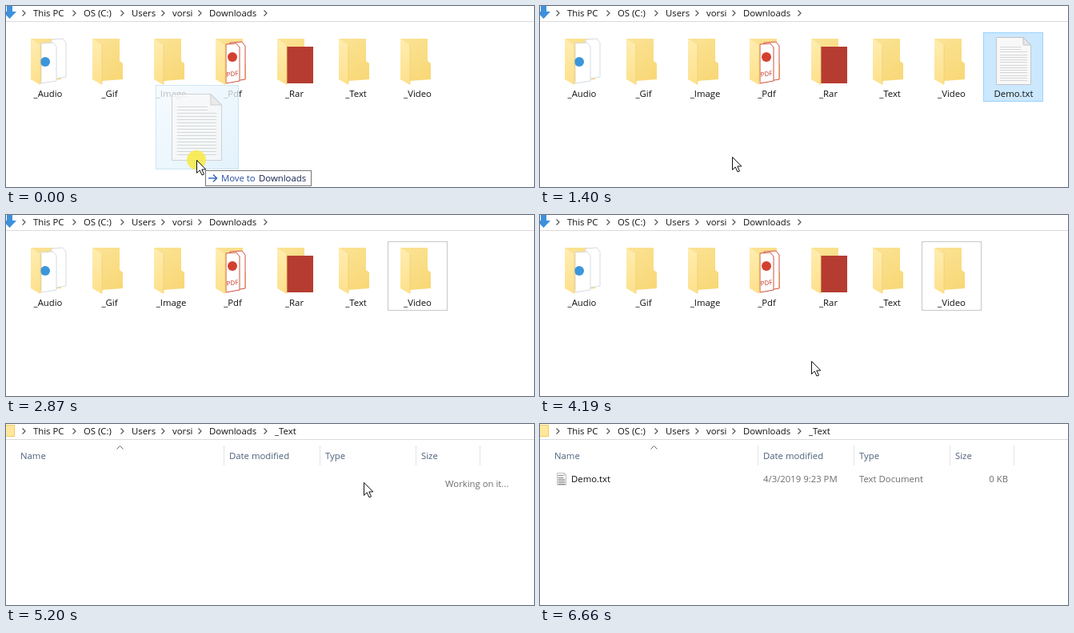
An HTML page with a canvas that plays this animation: 660 by 227 pixels, repeating every 6.97 s.

```html
<!DOCTYPE html>
<html lang="en">
<head>
<meta charset="utf-8">
<title>Sorting a download</title>
<style>
html, body { margin: 0; width: 660px; height: 227px; overflow: hidden; background: #fff; }
canvas { display: block; }
</style>
</head>
<body>
<canvas id="stage" width="660" height="227"></canvas>
<script>
const ctx = document.getElementById('stage').getContext('2d');
const LOOP = 6970, STEP = 77;
const FOLDERS = ['_Audio', '_Gif', '_Image', '_Pdf', '_Rar', '_Text', '_Video'];
const CRUMBS = [['This PC', 34], ['OS (C:)', 97], ['Users', 157], ['vorsi', 208], ['Downloads', 254]];
const APPROACH = [[339, 183], [347, 173], [360, 153], [383, 119], [411, 109], [430, 94], [442, 80], [447, 73]];
const cellX = i => 15 + i * 77;

function text(s, x, y, color = '#111', align = 'left', size = 11.35) {
  ctx.font = size + 'px "Open Sans", sans-serif';
  ctx.fillStyle = color;
  ctx.textAlign = align;
  ctx.fillText(s, x, y);
}

function poly(points, fill, stroke, width = 1) {
  ctx.beginPath();
  points.forEach(([x, y]) => ctx.lineTo(x, y));
  ctx.closePath();
  if (fill) { ctx.fillStyle = fill; ctx.fill(); }
  if (stroke) { ctx.strokeStyle = stroke; ctx.lineWidth = width; ctx.stroke(); }
}

function line(points, color, width = 1) {
  ctx.beginPath();
  points.forEach(([x, y]) => ctx.lineTo(x, y));
  ctx.strokeStyle = color;
  ctx.lineWidth = width;
  ctx.stroke();
}

function box(x, y, w, h, fill, stroke) {
  if (fill) { ctx.fillStyle = fill; ctx.fillRect(x, y, w, h); }
  if (stroke) { ctx.strokeStyle = stroke; ctx.lineWidth = 1; ctx.strokeRect(x + .5, y + .5, w - 1, h - 1); }
}

function disc(x, y, r, fill) {
  ctx.beginPath();
  ctx.arc(x, y, r, 0, 7);
  ctx.fillStyle = fill;
  ctx.fill();
}

function gradient(x0, y0, x1, y1, from, to) {
  const g = ctx.createLinearGradient(x0, y0, x1, y1);
  g.addColorStop(0, from);
  g.addColorStop(1, to);
  return g;
}

function page(x, y, w, h, rows, ink) {
  const fold = w * .22;
  poly([[x, y], [x + w - fold, y], [x + w, y + fold], [x + w, y + h], [x, y + h]], '#f8f8f8', '#c4c4c4');
  poly([[x + w - fold, y], [x + w - fold, y + fold], [x + w, y + fold]], '#e6e6e6', '#c4c4c4');
  for (let i = 0; i < rows; i++) {
    const ly = Math.round(y + h * (.19 + .72 * i / (rows - 1))) + .5;
    line([[x + w * .1, ly], [x + w * (i < 2 ? .72 : .9), ly]], ink);
  }
}

const sheet = (x, y, w, h, stroke) =>
  poly([[x, y], [x + w - 4, y - 1], [x + w, y + 4], [x + w, y + h - 3], [x, y + h]], '#fff', stroke);

function contents(name) {
  if (name === '_Audio') {
    sheet(42, 9, 18, 50, '#d5dce2');
    sheet(29, 14, 19, 50, '#d5dce2');
    disc(34, 37, 6, '#3b96dc');
  } else if (name === '_Pdf') {
    sheet(34, 13, 19, 49, '#d3523f');
    sheet(29, 15, 17, 49, '#d3523f');
    disc(37, 31, 6, '#d3402f');
    ctx.save();
    ctx.translate(29, 56);
    ctx.rotate(-.12);
    text('PDF', 1, 0, '#c4341f', 'left', 8);
    ctx.restore();
  } else if (name === '_Rar') {
    box(28, 18, 33, 46, '#b63c31');
  }
}

function folder(i) {
  const name = FOLDERS[i], x = cellX(i);
  ctx.save();
  ctx.translate(x, 33);
  poly([[16, 8], [50, 8], [50, 36], [54, 39], [54, 59], [28, 61], [16, 59]], gradient(16, 8, 54, 59, '#fbe396', '#f8d775'));
  contents(name);
  poly([[16, 8], [28, 16], [28, 66], [16, 59]], gradient(16, 8, 28, 66, '#ffedb0', '#fde08b'));
  line([[28, 16], [28, 65]], '#f1cf70', .8);
  ctx.restore();
  text(name, x + 37.5, 114, '#111', 'center');
}

function chevron(x) {
  line([[x, 5.5], [x + 3.5, 9], [x, 12.5]], '#555', 1.2);
}

function header(inText) {
  if (inText) {
    box(-3, 1, 14, 15, '#ffe79c', '#f0cb64');
  } else {
    poly([[1, -1], [8, -1], [8, 7], [13, 7], [4.5, 16], [-4, 7], [1, 7]], '#3c90dc');
  }
  chevron(20.5);
  const crumbs = inText ? [...CRUMBS, ['_Text', 336]] : CRUMBS;
  crumbs.forEach(([name, x], i) => {
    text(name, x, 13);
    if (i < 5) chevron([83.5, 143.5, 194.5, 240.5, 322.5][i]);
  });
  box(0, 19, 660, 1, '#dadada');
}

function cursorAt(t) {
  if (t < 80) return [238, 193];
  if (t < 310) return [239, 188];
  if (t < 1400) return [240, 187];
  if (t < 2100) {
    const p = Math.min(1, Math.floor((t - 1400) / STEP) / 8), q = 1 - p;
    return [240 * q * q + 760 * p * q + 261 * p * p, 189 * q * q - 390 * p * q + 225 * p * p];
  }
  if (t < 4040) return null;
  if (t < 4190) return [336, 186];
  if (t < 4900) return APPROACH[Math.min(7, Math.floor((t - 4190) / STEP))];
  if (t < 5890) return [447, 73];
  if (t < 6590) {
    const p = Math.min(1, Math.floor((t - 5890) / STEP) / 8) ** 1.6;
    return [441 - 101 * p, 90 + 78 * p];
  }
  return t < 6660 ? [329, 192] : null;
}

function iconView(t, cursor) {
  const selected = t >= 4900 ? 5 : t >= 1330 && t < 2800 ? 7 : -1;
  const count = selected === 7 ? 8 : 7;
  for (let i = 0; i < count; i++) {
    const x = cellX(i);
    const hover = cursor && cursor[0] >= x && cursor[0] < x + 75 && cursor[1] >= 33 && cursor[1] < 120;
    if (i === selected) box(x, 33, 75, 87, '#cce8ff', '#99d1ff');
    else if (hover) box(x, 33, 75, 87, '#e5f3ff');
    if (i === 6 && t >= 2870 && t < 4900) box(x, 33, 75, 87, null, '#c8c8c8');
    if (i < 7) folder(i);
  }
  if (selected === 7) {
    page(570.5, 39.5, 43, 59, 14, '#d6d6d6');
    text('Demo.txt', 592, 114, '#111', 'center');
  }
}

function listView(t) {
  const head = '#4c607a', grey = '#6d6d6d';
  [['Name', 18], ['Date modified', 279], ['Type', 399], ['Size', 519]].forEach(([s, x]) => text(s, x, 44, head));
  [272, 392, 512, 592].forEach(x => box(x, 27, 1, 25, '#e2e2e2'));
  line([[138.5, 31.5], [142.5, 27.5], [146.5, 31.5]], '#666');
  if (t < 5280) {
    if (t >= 5200) text('Working on it...', 549, 79, grey);
    return;
  }
  if (t < 5890) box(15, 58, 574, 22, '#e5f3ff');
  page(21.5, 61.5, 11, 15, 6, '#8c8c8c');
  text('Demo.txt', 39, 73);
  text('4/3/2019 9:23 PM', 279, 73, grey);
  text('Text Document', 399, 73, grey);
  text('0 KB', 585, 73, grey, 'right');
}

function dragGhost([x, y]) {
  ctx.save();
  ctx.translate(x - 238, y - 193);
  ctx.globalAlpha = .75;
  box(187, 99, 104, 106, gradient(187, 99, 291, 205, '#f4faff', '#d9eefb'), '#c3dff0');
  page(207.5, 110.5, 62, 83, 16, '#cbcbcb');
  ctx.restore();
}

function dropHint([x, y]) {
  ctx.save();
  ctx.translate(x - 238, y - 193);
  box(249, 206, 133, 20, '#fff', '#767676');
  line([[253, 216], [263, 216]], '#2b62b8', 1.4);
  line([[259, 211.5], [263.5, 216], [259, 220.5]], '#2b62b8', 1.4);
  text('Move to', 269, 220, '#2a4fa3');
  text('Downloads', 316, 220, '#14214f');
  ctx.restore();
}

function pointer([x, y]) {
  ctx.save();
  ctx.translate(x + .5, y + .5);
  poly([[0, 0], [0, 16], [3.7, 12.5], [6.5, 18.5], [9, 17.5], [6.3, 11.5], [11.3, 11.5]], '#fff', '#111');
  ctx.restore();
}

function draw(t) {
  const cursor = cursorAt(t), inText = t >= 5120, dragging = t < 860;
  const pressed = t < 930 || (t >= 4900 && t < 4980) || (t >= 5050 && t < 5120);
  box(0, 0, 660, 227, '#fff');
  header(inText);
  if (inText) listView(t);
  else iconView(t, cursor);
  if (dragging) dragGhost(cursor);
  if (pressed) disc(...cursor, 12, 'rgba(248,234,66,.85)');
  if (dragging) dropHint(cursor);
  if (cursor) pointer(cursor);
}

const start = performance.now();
function tick() {
  draw((performance.now() - start) % LOOP);
  requestAnimationFrame(tick);
}
tick();
</script>
</body>
</html>
```
